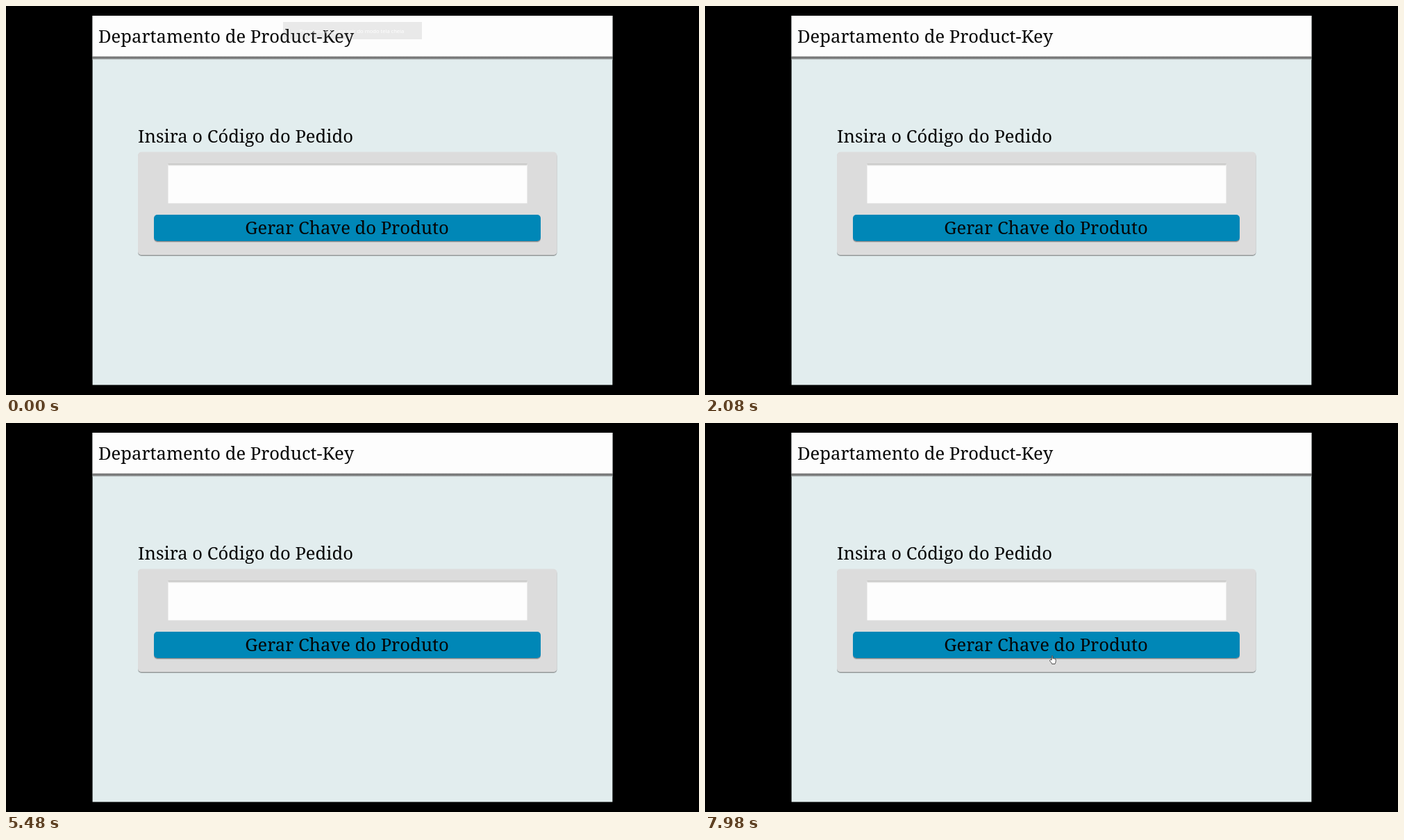
An HTML page for the animation above (8 s loop, 998 by 561 pixels).

```html
<!DOCTYPE html>
<html lang="pt-BR">
<head>
<meta charset="utf-8">
<title>Departamento de Product-Key</title>
<style>
  html, body { margin: 0; width: 100%; height: 100%; overflow: hidden; background: #000; }
  svg { display: block; width: 100%; height: 100%; }
  text { font: 25.6px "Noto Serif", "Liberation Serif", serif; fill: #050505; }
  .toast { animation: fade 8s linear infinite; }
  .toast text { font: 7.6px "Open Sans", "Noto Sans", sans-serif; fill: #fff; }
  .cursor { animation: travel 8s linear infinite; }
  .arrow { animation: arrow 8s step-end infinite; }
  .hand { animation: hand 8s step-end infinite; }

  @keyframes fade {
    0%, .25% { opacity: 1; }
    1.75%, 100% { opacity: 0; }
  }
  @keyframes travel {
    0%, 77.5% { transform: translate(8px, 499px); }
    82.5% { transform: translate(400px, 450px); }
    83.75%, 84% { transform: translate(435px, 443px); }
    88% { transform: translate(464px, 392px); }
    93% { transform: translate(494px, 341px); }
    95%, 100% { transform: translate(500px, 335px); }
  }
  @keyframes arrow {
    0% { opacity: 0; }
    77.5% { opacity: 1; }
    93.75%, 100% { opacity: 0; }
  }
  @keyframes hand {
    0% { opacity: 0; }
    93.75%, 100% { opacity: 1; }
  }
</style>
</head>
<body>
<svg viewBox="0 0 998 561" preserveAspectRatio="none">
  <defs>
    <linearGradient id="barShade" x2="0" y2="1">
      <stop offset="0" stop-color="#777"/>
      <stop offset=".55" stop-color="#7c7e7e"/>
      <stop offset="1" stop-color="#dce6e7"/>
    </linearGradient>
    <linearGradient id="inset" x2="0" y2="1">
      <stop offset="0" stop-color="#b9b9b7"/>
      <stop offset="1" stop-color="#fdfdfd"/>
    </linearGradient>
    <filter id="shadow" x="-5%" y="-10%" width="110%" height="125%">
      <feDropShadow dx="0" dy="1.4" stdDeviation=".6" flood-color="#555" flood-opacity=".6"/>
    </filter>
  </defs>

  <rect width="998" height="561" fill="#000"/>
  <rect x="124.6" y="14" width="748.8" height="532.5" fill="#e2edee"/>
  <rect x="124.6" y="14" width="748.8" height="59" fill="#fdfdfd"/>
  <rect x="124.6" y="72.7" width="748.8" height="5" fill="url(#barShade)"/>
  <text x="133" y="53">Departamento de Product-Key</text>

  <text x="190" y="197">Insira o Código do Pedido</text>
  <rect x="190" y="210.5" width="603.5" height="148.5" rx="5" fill="#dcdcdc" filter="url(#shadow)"/>
  <rect x="233.5" y="228" width="517" height="56.5" fill="#fdfdfd"/>
  <rect x="233.5" y="227.5" width="517" height="3.5" fill="url(#inset)"/>
  <rect x="213" y="301" width="557" height="38" rx="5" fill="#0087b7" filter="url(#shadow)"/>
  <text x="491" y="329" text-anchor="middle">Gerar Chave do Produto</text>

  <g class="toast">
    <rect x="399" y="23" width="200" height="25" fill="#888" opacity=".17"/>
    <text x="498" y="38.5" text-anchor="middle">Pressione  Esc  para sair do modo tela cheia</text>
  </g>

  <g class="cursor" stroke="#222" stroke-width=".8" fill="#fff" stroke-linejoin="round">
    <path class="arrow" d="M.5 .5V9L2.5 7.2 3.9 10.3 5.3 9.7 3.9 6.6H6.3Z"/>
    <path class="hand" d="M-.8 7V1Q0 -.4 .8 1V4.5Q2 3.7 2.4 5 3.5 4.4 3.9 5.4 5.2 5 5.2 6.5V8.5Q5 10.5 4 12.5H-.3Q-1 10.5-3.2 8.3-3.9 7-2.7 6.5-1.8 6.2-.8 7Z"/>
  </g>
</svg>
</body>
</html>
```
